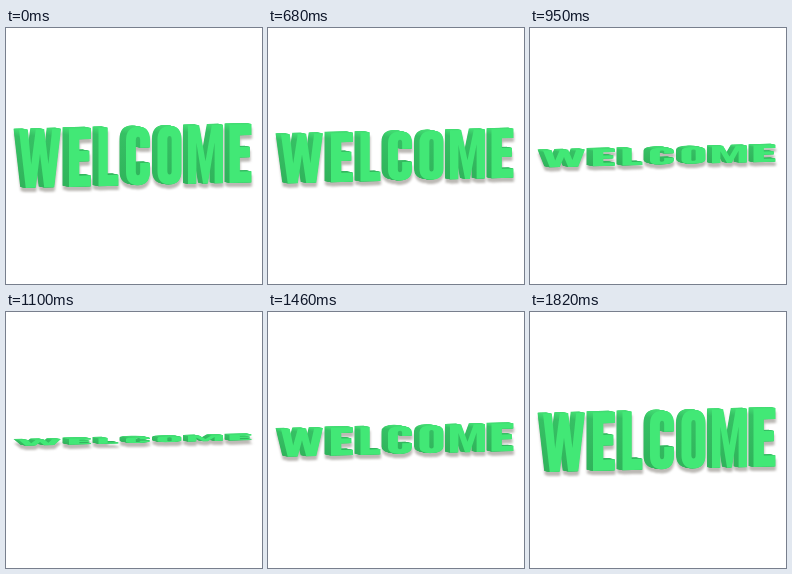
An HTML page with a canvas for the animation above (1.85 s loop, 256 by 256 pixels).

```html
<!DOCTYPE html>
<html lang="en">
<head>
<meta charset="utf-8">
<title>Welcome</title>
<style>
  html, body { margin: 0; width: 100%; height: 100%; overflow: hidden; background: #fff; }
  canvas { display: block; width: 256px; height: 256px; }
</style>
</head>
<body>
<canvas id="stage" width="256" height="256"></canvas>
<script>
const SIZE = 256, LOOP = 1850, HOLD = 530, STEP = 30, STEPS = 44;
const MIN_SCALE = 0.08, SLOPE = -0.025, HEIGHT = 58.5;
const FRONT = '#42e876';

// Glyph outlines in a unit box
const GLYPHS = {
  W: 'M0 0H.21L.29 .6L.4 0H.6L.7 .6L.79 0H1L.84 1H.6L.5 .42L.4 1H.16Z',
  E: 'M0 0H1V.19H.47V.39H.93V.57H.47V.81H1V1H0Z',
  L: 'M0 0H.46V.81H1V1H0Z',
  C: 'M0 .23Q0 0 .5 0Q1 0 1 .23V.36H.59V.23Q.59 .17 .5 .17Q.41 .17 .41 .23' +
     'V.77Q.41 .83 .5 .83Q.59 .83 .59 .77V.62H1V.77Q1 1 .5 1Q0 1 0 .77Z',
  O: 'M0 .23Q0 0 .5 0Q1 0 1 .23V.77Q1 1 .5 1Q0 1 0 .77Z' +
     'M.41 .23V.77Q.41 .83 .5 .83Q.59 .83 .59 .77V.23Q.59 .17 .5 .17Q.41 .17 .41 .23Z',
  M: 'M0 0H.32L.5 .62L.68 0H1V1H.76V.3L.57 1H.43L.24 .3V1H0Z'
};

// Letter, left and right edge of its face, depth
const WORD = [
  ['W', 13, 55, 5.5], ['E', 63, 85, 6.5], ['L', 92.5, 112.5, 6],
  ['C', 120, 144, 6.5], ['O', 151.5, 175.5, 5.5], ['M', 182, 217, 5],
  ['E', 223.5, 245.5, 5]
].map(([ch, left, right, depth]) =>
  ({ path: new Path2D(GLYPHS[ch]), left, width: right - left, depth }));

const ctx = document.getElementById('stage').getContext('2d');
const layer = document.createElement('canvas');
layer.width = layer.height = SIZE;
const pen = layer.getContext('2d');

// Lit from above: the upper rim stays bright
const side = pen.createLinearGradient(0, 0, 0, 1);
side.addColorStop(0, '#42dc72');
side.addColorStop(0.12, '#36c064');
side.addColorStop(1, '#30b35b');

function fillGlyph({ path, left, width }, scale, dx, dy, color) {
  const height = HEIGHT * scale;
  const middle = 131 + (left - 13) * SLOPE;
  pen.setTransform(width, SLOPE * width, 0, height, left + dx, middle - height / 2 + dy);
  pen.fillStyle = color;
  pen.fill(path, 'evenodd');
}

function drawLetter(letter, scale) {
  for (let d = letter.depth; d > 0; d -= 0.5) {
    fillGlyph(letter, scale, -d, -d * 0.2, side);
  }
  fillGlyph(letter, scale, 0, 0, FRONT);
}

function scaleAt(t) {
  if (t < HOLD) return 1;
  const n = Math.floor((t - HOLD) / STEP) + 1;
  const wave = (1 + Math.cos(2 * Math.PI * n / STEPS)) / 2;
  return MIN_SCALE + (1 - MIN_SCALE) * wave;
}

function draw(t) {
  const scale = scaleAt(t);
  pen.setTransform(1, 0, 0, 1, 0, 0);
  pen.clearRect(0, 0, SIZE, SIZE);
  WORD.forEach(letter => drawLetter(letter, scale));

  ctx.shadowColor = 'transparent';
  ctx.fillStyle = '#fff';
  ctx.fillRect(0, 0, SIZE, SIZE);
  ctx.shadowColor = 'rgba(70, 60, 50, 0.36)';
  ctx.shadowBlur = 2.5;
  ctx.shadowOffsetX = 0.5;
  ctx.shadowOffsetY = 4;
  ctx.drawImage(layer, 0, 0);
}

const start = performance.now();
function tick() {
  draw((performance.now() - start) % LOOP);
  requestAnimationFrame(tick);
}
tick();
</script>
</body>
</html>
```
